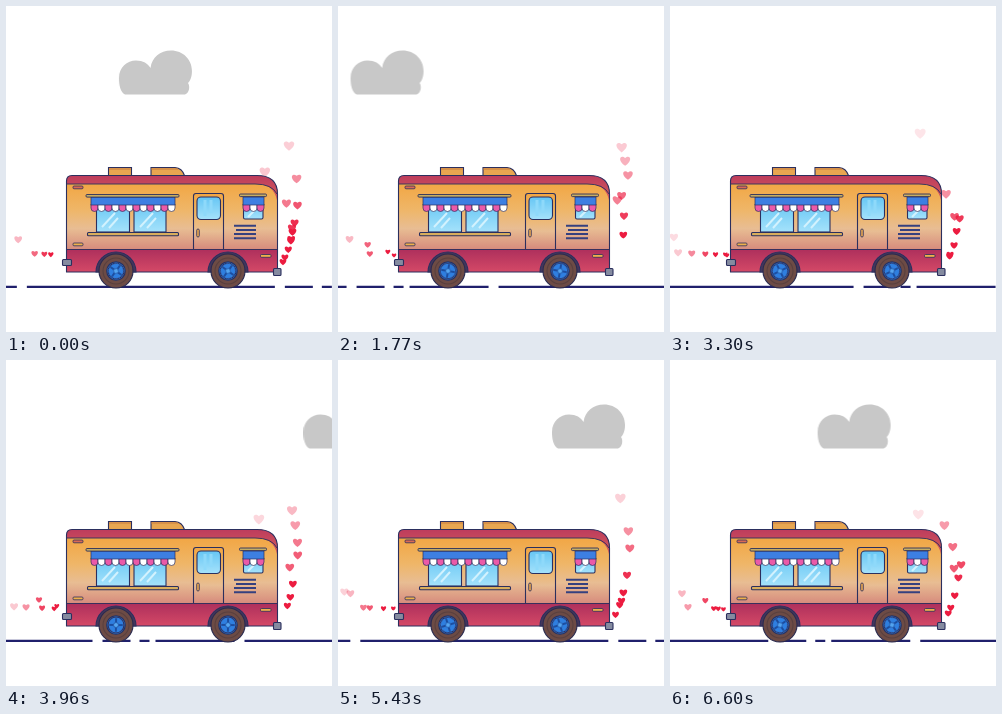
These frames come from a looping animation (326 by 326 pixels, 6.63 s). An HTML page:

```html
<!DOCTYPE html>
<html lang="en">
<head>
<meta charset="utf-8">
<title>Food truck</title>
<style>
html, body { margin: 0; width: 100%; height: 100%; overflow: hidden; background: #fff; }
svg { display: block; width: 100vw; height: 100vh; }
.cloud { animation: drift 6.63s linear infinite; }
.road { stroke-dasharray: 28 9 10 6 79 10 248 10; animation: roll 6.63s linear infinite; }
.hub { transform-box: fill-box; transform-origin: center; animation: spin .663s linear infinite; }
@keyframes drift {
  0% { transform: translateX(0); }
  49.74% { transform: translateX(-187px); }
  49.75% { transform: translateX(222px); }
  100% { transform: translateX(33px); }
}
@keyframes roll { from { stroke-dashoffset: 121; } to { stroke-dashoffset: 1096; } }
@keyframes spin { to { transform: rotate(360deg); } }
</style>
</head>
<body>
<svg viewBox="0 0 326 326">
  <defs>
    <linearGradient id="side" x1="0" y1="0" x2="0" y2="1">
      <stop offset="0" stop-color="#f2a643"/>
      <stop offset=".4" stop-color="#efb668"/>
      <stop offset=".68" stop-color="#e8bd93"/>
      <stop offset="1" stop-color="#d68a7c"/>
    </linearGradient>
    <linearGradient id="skirt" x1="0" y1="0" x2="0" y2="1">
      <stop offset="0" stop-color="#ad2f5c"/>
      <stop offset="1" stop-color="#d64a67"/>
    </linearGradient>
    <linearGradient id="roof" x1="0" y1="0" x2="0" y2="1">
      <stop offset="0" stop-color="#bd3b5d"/>
      <stop offset="1" stop-color="#d9655a"/>
    </linearGradient>
    <linearGradient id="glass" x1="0" y1="0" x2="0" y2="1">
      <stop offset="0" stop-color="#66c6f4"/>
      <stop offset="1" stop-color="#a5e2fb"/>
    </linearGradient>
    <clipPath id="body"><path d="M60.5 266V175Q60.5 169.500 66 169.500H251Q271.500 169.500 271.500 188V266Z"/></clipPath>
    <g id="wheel">
      <circle r="17" fill="#6d4b45" stroke="#2a2a4e"/>
      <circle r="13" fill="none" stroke="#59403f"/>
      <circle r="9.300" fill="#2f7fe0" stroke="#26305f"/>
      <g class="hub">
        <circle r="8" fill="none"/>
        <path d="M0-6V6M-6 0H6" stroke="#1c4d9e" stroke-width="2" stroke-linecap="round" stroke-dasharray="2.500 7"/>
        <circle r="2.500" fill="#55a6f2" stroke="#1c4d9e" stroke-width=".8"/>
      </g>
    </g>
  </defs>

  <path class="cloud" fill="#c8c8c8" d="M119 88.500C114.500 86 113 80 113 72C113 61 121 54.500 130 54.500C137 54.500 142 57.500 144.500 62C146 51 154 44.500 165 44.500C177 44.500 186 53.500 186 65C186 71 184 75 182 77C184.500 81 183 87 179 88.500Z"/>
  <g id="hearts"></g>
  <path class="road" d="M0 280.800H326" stroke="#20206c" stroke-width="2.200"/>

  <g stroke="#2b2f5e" stroke-width="1.100">
    <path d="M102.500 169.500V161.500H125.500V169.500Z" fill="#e8a650"/>
    <path d="M145 169.500V161.500H169Q176 162 178.500 169.500Z" fill="#e8a650"/>
    <path d="M103 163H125M145 163H172" stroke="#c77f43"/>
    <g clip-path="url(#body)" stroke="none">
      <path fill="url(#side)" d="M60 177H272V244H60Z"/>
      <path fill="url(#roof)" d="M60 169H272V200Q270 178 251 178H60Z"/>
      <path fill="url(#skirt)" d="M60 243H272V267H60Z"/>
    </g>
    <path d="M60.500 178H249Q266 178 271 188M60.500 243.500H271.500" fill="none" stroke-width=".9"/>
    <path d="M60.500 266V175Q60.500 169.500 66 169.500H251Q271.500 169.500 271.500 188V266Z" fill="none"/>

    <path d="M187.500 243V190Q187.500 187.500 190 187.500H215Q217.500 187.500 217.500 190V243" fill="url(#side)"/>
    <rect x="191" y="191" width="23.500" height="22.500" rx="4" fill="url(#glass)"/>
    <path d="M199 194V210M205 194V207" stroke="#8ed9fa" stroke-width="3"/>
    <rect x="190.700" y="223" width="2.600" height="8" rx="1.300" fill="#e8a650" stroke-width=".8"/>

    <g fill="url(#glass)">
      <rect x="90.500" y="196" width="33" height="30"/>
      <rect x="128" y="196" width="32" height="30"/>
      <rect x="237.500" y="196" width="19.500" height="17" rx="1.500"/>
    </g>
    <path d="M96 221L109 207M103 222L112 212M134 221L147 207M141 222L150 212M242 211L248 205" stroke="#d2f2fe" stroke-width="2"/>
    <rect x="81.500" y="226.500" width="91" height="3.300" rx="1" fill="#d9ae5c"/>

    <g id="awnings" stroke-width=".7"></g>
    <g fill="#3d7fe2">
      <rect x="85" y="191" width="84" height="8" stroke-width=".7"/>
      <rect x="237" y="191" width="21" height="8" stroke-width=".7"/>
    </g>
    <g fill="#c6ad62" stroke-width=".9">
      <rect x="80" y="188.500" width="93" height="2.600" rx="1"/>
      <rect x="233.500" y="188" width="27" height="2.600" rx="1"/>
    </g>

    <path d="M228 219.700H250M230 223.900H250M228 228.100H250M228 232.300H250" stroke="#35407f" stroke-width="2"/>
    <g stroke-width=".8">
      <rect x="67" y="180" width="10" height="2.800" rx="1" fill="#d96a55"/>
      <rect x="67" y="237" width="10" height="2.800" rx="1" fill="#efb04b"/>
      <rect x="254.500" y="248.500" width="10.500" height="2.800" rx="1" fill="#efb04b"/>
    </g>
    <rect x="56.500" y="253.500" width="9" height="6" rx="1" fill="#858ba0"/>
    <rect x="267.500" y="262.500" width="7.500" height="7" rx="1" fill="#858ba0"/>
    <g fill="#43365b">
      <path d="M90 266A20 20 0 0 1 130 266Z"/>
      <path d="M202 266A20 20 0 0 1 242 266Z"/>
    </g>
    <use href="#wheel" x="110" y="265"/>
    <use href="#wheel" x="222" y="265"/>
  </g>
</svg>
<script>
const LOOP = 6630, LIFE = 1500;
const $ = id => document.getElementById(id);

function add(parent, attrs) {
  const el = document.createElementNS('http://www.w3.org/2000/svg', 'path');
  for (const key in attrs) el.setAttribute(key, attrs[key]);
  parent.append(el);
  return el;
}

function scallops(x, count) {
  for (let i = 0; i < count; i++) {
    add($('awnings'), {
      d: `M${x + i * 7} 198v4a3.5 3.5 0 0 0 7 0v-4z`,
      fill: i % 2 ? '#fff' : '#ea5aa8'
    });
  }
}
scallops(85, 12);
scallops(237, 3);

// Rising trails: x at even steps of progress, y from 256 to the given end.
function rise(xs, endY) {
  return s => {
    const k = Math.min(s * 8, 7.999), i = Math.floor(k);
    return [xs[i] + (xs[i + 1] - xs[i]) * (k - i), 256 + (endY - 256) * s, 6.8 + 4.2 * s];
  };
}
// Trails behind the truck drift left.
const trail = climb => s => [57 - 56 * s, 249.5 - climb * Math.pow(s, .8), 4.5 + 4 * s];

const outer = rise([277, 284, 287, 291, 292, 291, 288, 284, 277], 126);
const inner = rise([277, 283, 286, 286, 283, 278, 269, 258, 246], 152);
const steep = rise([277, 284, 286, 286, 284, 279, 271, 261, 249], 126);

// Each stream: trail, share of the full life, birth times in ms.
const streams = [
  [outer, 1, [-1365, -1035, -750, -550, -440, -90, 240, 420, 555, 700, 2700, 2850, 3030,
    3165, 3495, 3780, 4050, 4380, 4860, 5910, 6060, 6280]],
  [inner, 1, [-1330, -930, -590, -420, 0, 800, 2250, 2550, 3165, 3600, 5000, 5130, 5820, 6420, 6530]],
  [steep, 1, [15, 915, 1140, 1365, 1815, 5490, 5715]],
  [outer, .6, [-330, -210, 1930, 2130, 2370, 4200, 4470, 4560, 5240, 5400]],
  [trail(3), 1, [-850, -600, -420, 80, 1000, 1720, 1960, 2280, 2620, 2900, 3300, 3640, 4500,
    4660, 5030, 5490, 6150, 6280, 6450]],
  [trail(19), 1, [-1245, 510, 945, 1500, 1865, 3220, 3720, 4050, 4190, 5350, 5920]]
];

const hearts = streams.flatMap(([at, share, births]) => births.map(birth => ({
  at, share, birth,
  el: add($('hearts'), { d: 'M0 4.7C-8.500 -1 -4.500 -7 0 -3C4.500 -7 8.500 -1 0 4.700Z', fill: '#ec1c40' })
})));

let start;
function draw(now) {
  start ??= now;
  const t = (now - start) % LOOP;
  for (const { at, share, birth, el } of hearts) {
    const u = (t - birth) / LIFE;
    const alive = u >= 0 && u < share;
    el.style.display = alive ? '' : 'none';
    if (!alive) continue;
    const [x, y, size] = at(Math.pow(u, 1.2));
    el.setAttribute('transform', `translate(${x} ${y}) scale(${size / 10})`);
    el.setAttribute('opacity', Math.min(1, 1.4 - 1.3 * u));
  }
  requestAnimationFrame(draw);
}
requestAnimationFrame(draw);
</script>
</body>
</html>
```
